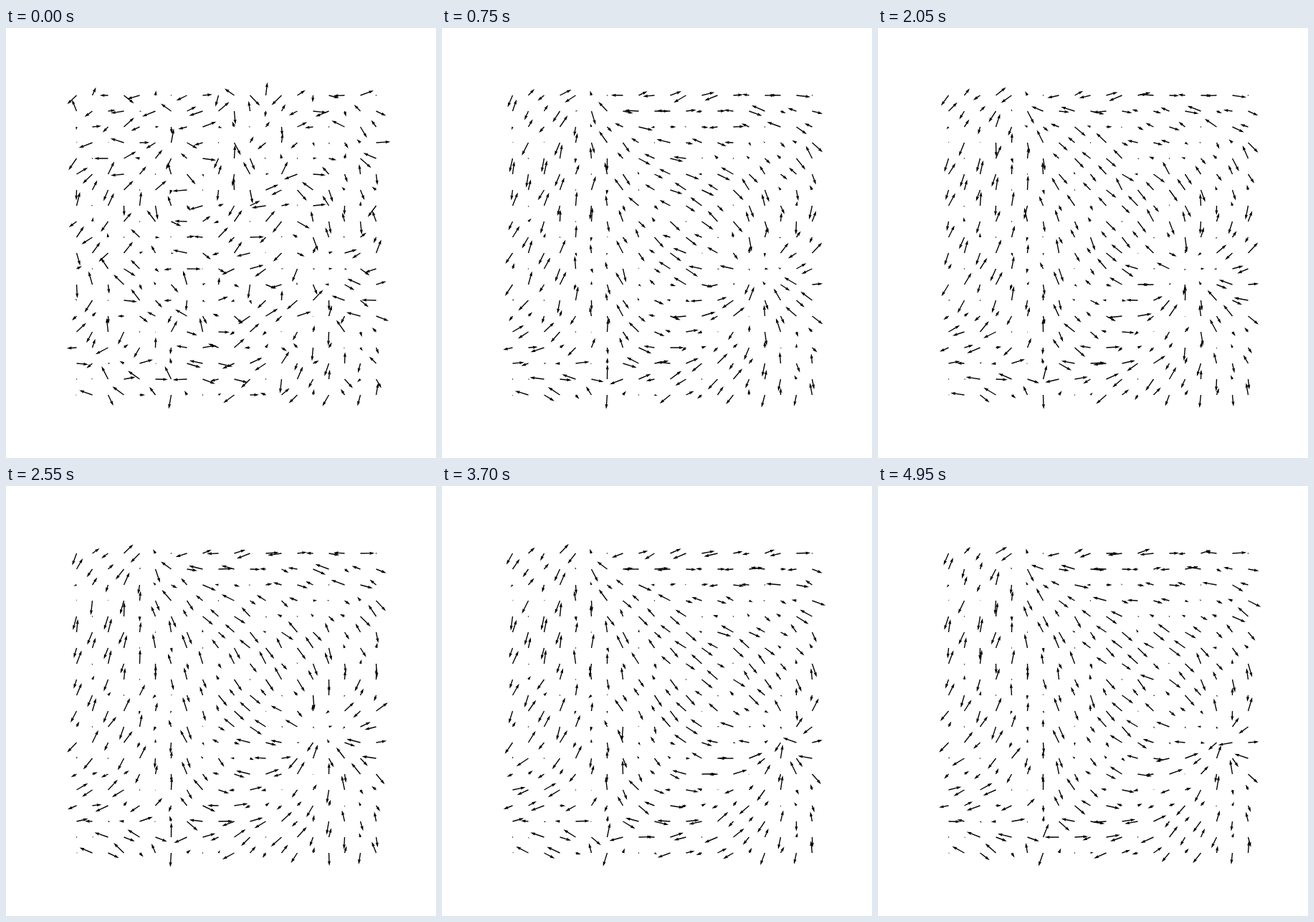
An HTML page with a canvas for the animation above (5000 ms loop, 600 px wide and 600 px high).

```html
<!DOCTYPE html>
<html>
<head>
<meta charset="utf-8">
<title>Antiferromagnetic spins</title>
<style>
html, body { margin: 0; width: 100%; height: 100%; overflow: hidden; background: #fff; }
canvas { display: block; width: 600px; height: 600px; }
</style>
</head>
<body>
<canvas id="stage" width="600" height="600"></canvas>
<script>
const ctx = document.getElementById('stage').getContext('2d');
const N = 20, CELL = 22, LEFT = 98.5, TOP = 94;
const STEP = 50, STEPS = 100;
const MAX_LENGTH = 20.2, WIDTH = 1.386;
const RAD = Math.PI / 180;

// Positions are in cells, angles in degrees
const SOURCE = { x: 5, y: -0.3 };
const SADDLE = { x: 6, y: 17.7 };
const SINK_START = { x: 15, y: 11.1 };
const SINK_END = { x: 17.2, y: 11.8 };

// Early twists of the field that relax away
const TWISTS = [
  { x: 10.5, y: 4.4, rx: 3.5, ry: 7, turn: -130 },
  { x: 3.7, y: 2.5, rx: 3.2, ry: 3.2, turn: 65 },
  { x: 3.5, y: 13.2, rx: 2.8, ry: 2.8, turn: -85 }
];

const random = n => {
  const v = Math.sin(n * 12.9898 + 4.1) * 43758.5453;
  return v - Math.floor(v);
};
const noise = n => random(n) + random(n + 0.37) + random(n + 0.71) - 1.5;
const mix = (a, b, p) => a + (b - a) * p;
const bearing = (from, x, y) => Math.atan2(y - from.y, x - from.x) / RAD;

// In-plane part of a spin with a fixed random tilt
const spinLength = site => MAX_LENGTH * Math.sin(Math.PI * random(site + 1));

function sinkAt(t) {
  const p = Math.min(1, Math.max(0, (t - 2200) / 1600));
  const ease = p * p * (3 - 2 * p);
  return { x: mix(SINK_START.x, SINK_END.x, ease), y: mix(SINK_START.y, SINK_END.y, ease) };
}

// Three vortices on a background that turns steadily downwards
function fieldAngle(x, y, t, sink) {
  let angle = 85 - 44 * Math.exp(-x / 4) + 6.4 * (y - 9);
  angle += bearing(SOURCE, x, y) + bearing(sink, x, y) - bearing(SADDLE, x, y);
  const fade = Math.exp(-t / 420);
  for (const w of TWISTS)
    angle += w.turn * fade * Math.exp(-(((x - w.x) / w.rx) ** 2) - ((y - w.y) / w.ry) ** 2);
  return angle;
}

function arrow(x, y, angle, length) {
  ctx.save();
  ctx.translate(x, y);
  ctx.rotate(angle * RAD);
  ctx.scale(WIDTH, WIDTH);
  ctx.beginPath();
  const size = length / WIDTH;
  if (size < 1) {
    ctx.arc(0, 0, 0.5, 0, 2 * Math.PI);
  } else {
    // Arrows shorter than a full head shrink as a whole
    const tip = Math.max(5, size), k = size / tip;
    ctx.scale(k, k);
    const half = [[0, 0.5], [tip - 4.5, 0.5], [tip - 5, 1.5], [tip, 0]];
    half.forEach(([px, py]) => ctx.lineTo(px, py));
    half.reverse().forEach(([px, py]) => ctx.lineTo(px, -py));
  }
  ctx.fill();
  ctx.restore();
}

function draw(step) {
  const t = step * STEP;
  const sink = sinkAt(t);
  const heat = 15 + 35 * Math.exp(-t / 250);
  ctx.fillStyle = '#fff';
  ctx.fillRect(0, 0, 600, 600);
  ctx.fillStyle = '#000';
  for (let site = 0; site < N * N; site++) {
    const col = site % N, row = Math.floor(site / N);
    const length = spinLength(site);
    const stiffness = Math.max(0.3, Math.min(1, length / 14));
    const jitter = heat * noise(site + step * 401) / stiffness;
    const flip = (col + row) % 2 * 180;
    arrow(LEFT + col * CELL, TOP + row * CELL,
      fieldAngle(col, row, t, sink) + jitter + flip, length);
  }
}

const start = performance.now();
function tick() {
  draw(Math.floor((performance.now() - start) / STEP) % STEPS);
  requestAnimationFrame(tick);
}
tick();
</script>
</body>
</html>
```
